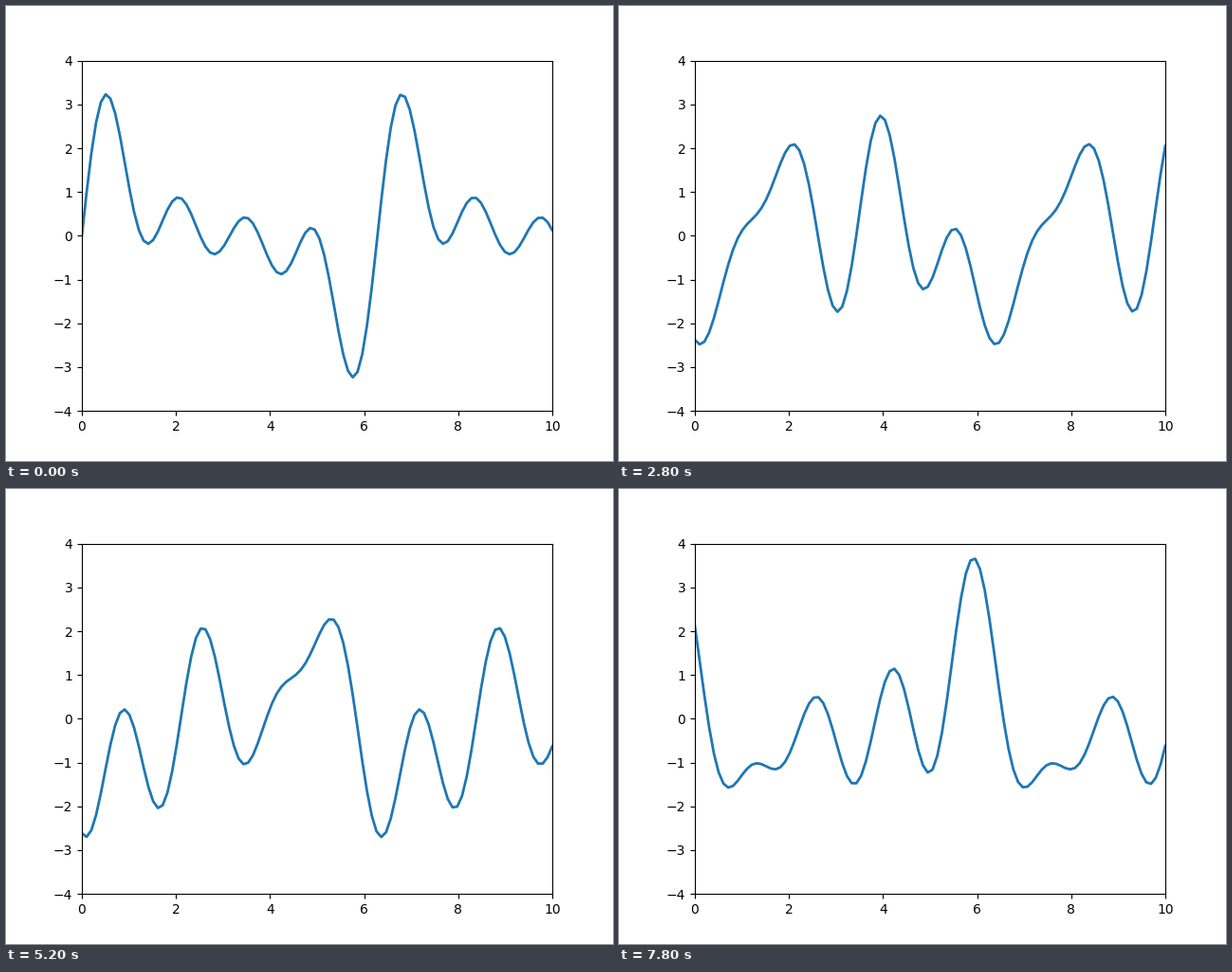
These frames come from a looping animation (640 px wide and 480 px high, 8 s). A matplotlib script:

```python
import numpy as np
import matplotlib.pyplot as plt
from matplotlib.animation import FuncAnimation

FRAMES = 40
INTERVAL = 200  # ms
DT = 0.1

# One travelling sine per wavenumber, each with its own phase speed
WAVENUMBERS = np.array([1, 2, 3, 4])
SPEEDS = np.array([1.0, 0.5, 0.9, 1.4])

x = np.linspace(0, 10, 100)


def wave(t):
    phase = WAVENUMBERS[:, None] * (x - SPEEDS[:, None] * t)
    return np.sin(phase).sum(axis=0)


plt.rcParams["font.family"] = "DejaVu Sans"
fig, ax = plt.subplots(figsize=(6.4, 4.8), dpi=100)
ax.set_xlim(0, 10)
ax.set_ylim(-4, 4)
line, = ax.plot(x, wave(0), lw=2, color="#1f77b4")


def update(i):
    line.set_ydata(wave(i * DT))
    return line,


anim = FuncAnimation(fig, update, frames=FRAMES, interval=INTERVAL,
                     init_func=lambda: update(0), repeat=True,
                     repeat_delay=0)

plt.show()
```
